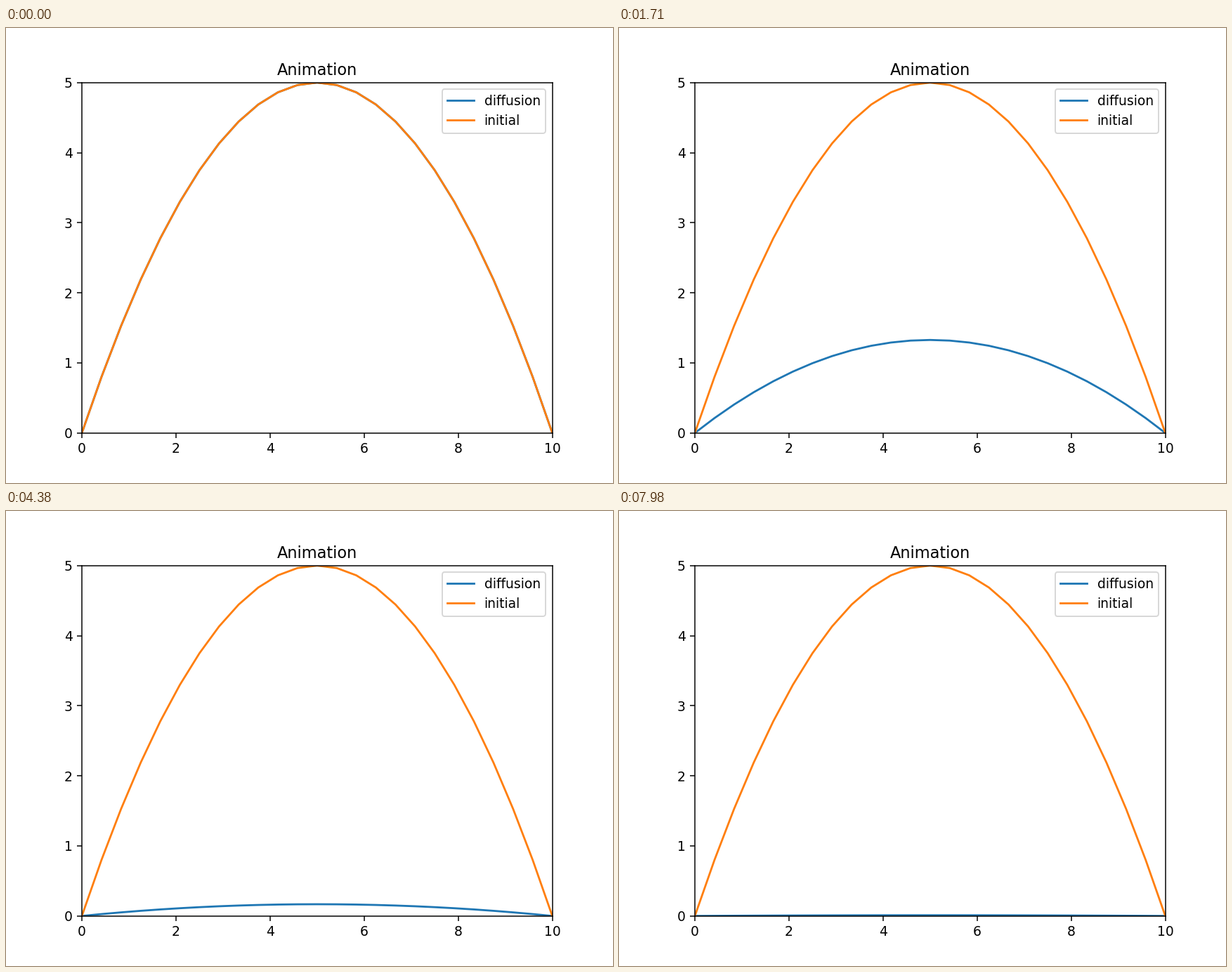
Recreate the animation shown at these times as a matplotlib script. Size 864x648 px, loop 8 s.

```python
import matplotlib.pyplot as plt
import numpy as np
from matplotlib.animation import FuncAnimation

LOOP_MS = 8000
FRAMES = 267
LENGTH = 10
PEAK = 5
KEEP = 0.977  # share of the profile left after each step

x = np.linspace(0, LENGTH, 25)
start = 4 * PEAK * x * (LENGTH - x) / LENGTH**2

fig, ax = plt.subplots(figsize=(6.4, 4.8), dpi=135)
curve, = ax.plot(x, start, label="diffusion")
ax.plot(x, start, label="initial")
ax.set_xlim(0, LENGTH)
ax.set_ylim(0, PEAK)
ax.set_title("Animation")
ax.legend(loc="upper right")


def update(step):
    curve.set_ydata(start * KEEP**step)
    return curve,


anim = FuncAnimation(fig, update, frames=FRAMES, interval=LOOP_MS / FRAMES,
                     repeat=True, repeat_delay=0)
plt.show()
```
